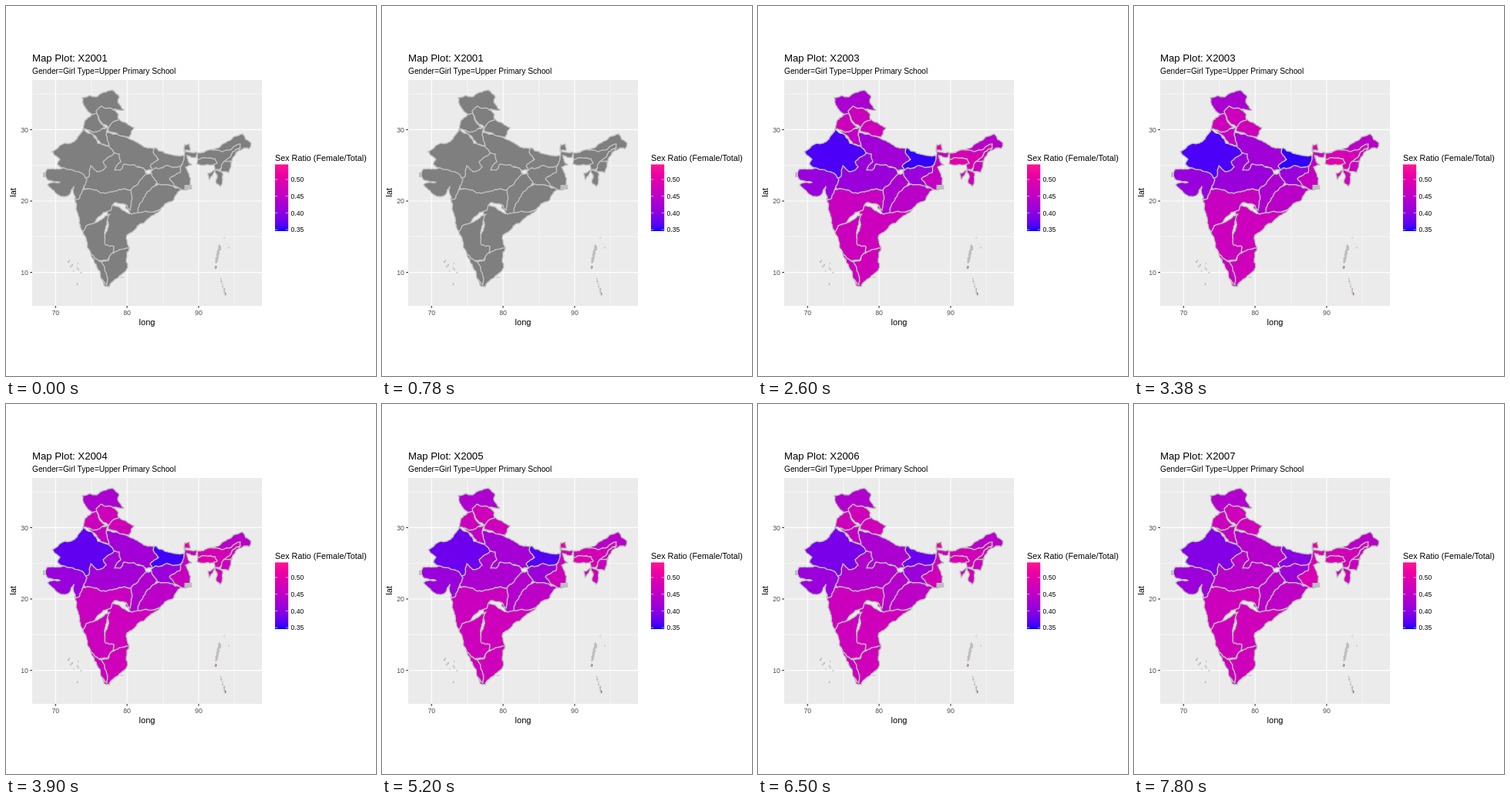
Animation, 480 px wide and 480 px high, one loop 8000 ms. Source, as an HTML page with a canvas:

```html
<!DOCTYPE html>
<html>
<head>
<meta charset="utf-8">
<style>
html, body { margin: 0; width: 100%; height: 100%; overflow: hidden; background: #fff; }
canvas { display: block; }
</style>
</head>
<body>
<canvas id="stage" width="480" height="480"></canvas>
<script>
const ctx = document.getElementById('stage').getContext('2d');
const LOOP = 8000, STEP = 1300, FIRST_YEAR = 2001, LAST_STEP = 6;
const BORDER = '#bebebe', MISSING = '#7f7f7f';
const FONT = '"Liberation Sans", Arial, sans-serif';
const lonX = lon => 64.3 + (lon - 70) * 9.28;
const latY = lat => 160.4 + (30 - lat) * 9.26;
const ratioY = ratio => 225 + (0.5 - ratio) * 434;
const mix = (a, b, t) => a + (b - a) * t;
const noise = seed => {
  const n = Math.sin(seed) * 43758.5453;
  return n - Math.floor(n);
};
const regions = [];

// Blue to deep pink, blended in Lab space; t runs from 0 to 1.
function scaleColor(t) {
  const fy = (mix(32.3, 55.96, t) + 16) / 116;
  const x = 0.9505 * (fy + mix(79.2, 84.5, t) / 500) ** 3;
  const y = fy ** 3;
  const z = 1.089 * (fy - mix(-107.9, -5.7, t) / 200) ** 3;
  const channel = v => {
    v = Math.min(1, Math.max(0, v));
    return Math.round(255 * (v < 0.0031 ? 12.92 * v : 1.055 * v ** (1 / 2.4) - 0.055));
  };
  return `rgb(${channel(3.2406 * x - 1.5372 * y - 0.4986 * z)},${
    channel(-0.9689 * x + 1.8758 * y + 0.0415 * z)},${
    channel(0.0557 * x - 0.204 * y + 1.057 * z)})`;
}

// Midpoint displacement: splits a border until its pieces are short.
function roughLine(path, x1, y1, x2, y2) {
  const dx = x2 - x1, dy = y2 - y1;
  if (Math.hypot(dx, dy) < 3) {
    path.lineTo(x2, y2);
    return;
  }
  const shift = (noise(x1 * 12.9 + y1 * 78.2 + x2 * 3.7 + y2) - 0.5) * 0.26;
  const mx = (x1 + x2) / 2 - dy * shift, my = (y1 + y2) / 2 + dx * shift;
  roughLine(path, x1, y1, mx, my);
  roughLine(path, mx, my, x2, y2);
}

function outline(corners) {
  const points = corners.split(' ').map(p => p.split(',').map(Number));
  const path = new Path2D();
  path.moveTo(...points[0]);
  points.forEach((p, i) => roughLine(path, ...p, ...points[(i + 1) % points.length]));
  path.closePath();
  return path;
}

// The level moves between two scale positions; bend shapes the pace.
// Later regions cover earlier ones and own the shared border.
function region(from, to, bend, corners) {
  const level = step => mix(from, to, ((step - 1) / (LAST_STEP - 1)) ** bend);
  regions.push({ level, path: outline(corners) });
}

// Centre and east
region(0.37, 0.48, 3, '131,164 158,171 175,180 193,185 199,192 197,212 140,217 133,190');
region(0.27, 0.5, 0.75, '134,191 147,192 149,202 141,213 148,213 153,205 178,210 182,218 165,242 105,242 98,232 106,203');
region(0.42, 0.5, 1, '182,218 194,218 198,226 188,240 180,266 168,276 155,262 161,240 174,226');
region(0.03, 0.27, 2.5, '193,184 204,189 231,194 232,199 224,212 190,213 187,208 198,199 191,189');
region(0.33, 0.36, 1, '188,215 195,210 222,209 230,206 226,216 218,235 198,232');
region(0.5, 0.53, 1, '199,231 211,232 228,238 222,243 218,251 204,260 200,264 168,275 175,255 181,244 190,235');
region(0.56, 0.7, 2, '232,192 231,187 248,190 247,196 234,194 241,206 233,209 239,229 241,237 227,238 212,224 226,216 229,205');

// South
region(0.62, 0.64, 1, '200,264 178,282 165,292 157,297 157,306 160,314 143,322 126,310 134,257 163,270 184,267');
region(0.58, 0.62, 1, '89,250 91,264 95,281 100,294 106,291 136,265 141,255 157,259 161,265 163,252 162,239 130,243 105,237 96,239');
region(0.6, 0.63, 1, '100,294 104,285 124,277 135,270 128,297 129,310 140,312 138,321 132,330 119,331 110,321 104,302');
region(0.64, 0.64, 1, '160,314 156,328 156,343 147,350 140,356 134,364 127,362 127,338 120,333 133,330 137,321 145,318');
region(0.6, 0.61, 1, '110,321 124,332 128,343 131,350 131,362 124,354 117,335');

// West and north
region(0, 0.24, 0.7, '100,160 113,167 119,178 133,182 140,191 126,202 130,209 118,215 110,207 107,222 100,226 73,210 67,206 70,199 60,189 69,182 84,178');
region(0.32, 0.35, 1, '50,217 53,212 74,210 94,215 105,225 98,243 95,250 90,252 88,234 83,244 71,247 54,232 70,229 55,226');
region(0.54, 0.56, 1, '107,162 124,159 133,157 130,168 134,181 123,179 113,167');
region(0.62, 0.62, 1, '117,137 106,145 100,160 113,164 129,157 120,147');
region(0.63, 0.64, 1, '135,152 147,147 166,158 160,170 147,168 133,163');
region(0.41, 0.46, 1, '99,119 117,118 138,109 147,118 145,124 153,135 131,138 112,141 101,129');
region(0.62, 0.64, 1, '117,136 123,130 146,141 146,148 133,157 121,147');

// North-east
region(0.78, 0.82, 1, '232,180 238,179 239,187 231,187');
region(0.49, 0.51, 1, '264,190 279,181 295,170 307,166 318,178 316,185 309,184 282,192');
region(0.7, 0.65, 1, '248,191 280,189 304,179 304,184 288,198 280,208 277,212 271,212 270,206 249,200');
region(0.78, 0.7, 1, '249,199 271,198 274,204 248,205');
region(0.62, 0.62, 1, '304,184 288,198 283,202 293,201 298,191');
region(0.6, 0.6, 1, '282,202 293,201 289,216 279,215');
region(0.64, 0.64, 1, '271,212 281,217 278,234 273,230');
region(0.64, 0.64, 1, '271,213 262,217 264,225');

function text(str, x, y, size, color = '#000', align = 'left') {
  ctx.font = `${size}px ${FONT}`;
  ctx.fillStyle = color;
  ctx.textAlign = align;
  ctx.fillText(str, x, y);
}

function line(x1, y1, x2, y2, color, width) {
  ctx.strokeStyle = color;
  ctx.lineWidth = width;
  ctx.beginPath();
  ctx.moveTo(x1, y1);
  ctx.lineTo(x2, y2);
  ctx.stroke();
}

function drawPanel() {
  ctx.fillStyle = '#ebebeb';
  ctx.fillRect(34, 96, 298, 293);
  const vertical = (lon, w) => line(lonX(lon), 96, lonX(lon), 389, '#fff', w);
  const horizontal = (lat, w) => line(34, latY(lat), 332, latY(lat), '#fff', w);
  for (let i = 0; i < 3; i++) {
    vertical(75 + i * 10, 0.55);
    horizontal(15 + i * 10, 0.55);
  }
  for (let i = 0; i < 3; i++) {
    const lon = 70 + i * 10, lat = 10 + i * 10;
    vertical(lon, 1.1);
    horizontal(lat, 1.1);
    line(lonX(lon), 389, lonX(lon), 391.8, '#333', 1.1);
    line(31.2, latY(lat), 34, latY(lat), '#333', 1.1);
    text(lon, lonX(lon), 401, 8.8, '#4d4d4d', 'center');
    text(lat, 29, latY(lat) + 3.3, 8.8, '#4d4d4d', 'right');
  }
}

// A chain of islets between two points, tapering to the given end size.
function islands(count, x1, y1, x2, y2, startSize, endSize, spread) {
  for (let i = 0; i < count; i++) {
    const t = i / (count - 1);
    const size = mix(startSize, endSize, t) * (0.7 + 0.6 * noise(i + x1));
    ctx.beginPath();
    ctx.ellipse(mix(x1, x2, t) + (noise(i * 7 + y1) - 0.5) * spread, mix(y1, y2, t),
      size, size * 1.5, 0.2, 0, 7);
    ctx.fill();
  }
}

function drawMap(step) {
  ctx.lineJoin = 'round';
  ctx.strokeStyle = BORDER;
  ctx.lineWidth = 1.45;
  for (const { level, path } of regions) {
    ctx.fillStyle = step ? scaleColor(level(step)) : MISSING;
    ctx.fill(path);
    ctx.stroke(path);
  }
  ctx.fillStyle = BORDER;
  ctx.fillRect(231.5, 232, 9.5, 6);
  ctx.fillRect(48, 216, 4, 6);
  ctx.fillRect(148, 351.5, 5, 1);
  islands(12, 277, 311, 273, 332, 1.6, 1.5, 2);
  islands(2, 272, 339, 283, 300.5, 1.4, 0.9, 0);
  islands(7, 278, 354, 285, 374, 0.8, 1.6, 2);
  islands(9, 87, 330, 92, 346, 0.8, 0.8, 14);
  islands(2, 92.5, 361, 289, 313.5, 0.8, 0.7, 0);
  ctx.fillStyle = step ? scaleColor(0.6) : MISSING;
  islands(2, 272.5, 339, 284.5, 373, 0.5, 0.5, 0);
}

function drawLegend() {
  text('Sex Ratio (Female/Total)', 349, 201, 10.8);
  const bar = ctx.createLinearGradient(0, 292, 0, 205.5);
  for (let i = 0; i <= 20; i++) bar.addColorStop(i / 20, scaleColor(i / 20));
  ctx.fillStyle = bar;
  ctx.fillRect(349, 205.5, 17.2, 86.5);
  for (let i = 0; i < 4; i++) {
    const ratio = 0.35 + i * 0.05, y = ratioY(ratio);
    line(349, y, 352.4, y, '#fff', 0.6);
    line(362.8, y, 366.2, y, '#fff', 0.6);
    text(ratio.toFixed(2), 369.5, y + 3.2, 8.7);
  }
}

function draw(time) {
  const step = Math.floor((time % LOOP) / STEP);
  ctx.fillStyle = '#fff';
  ctx.fillRect(0, 0, 480, 480);
  text('Map Plot: X' + (FIRST_YEAR + step), 34, 72, 13.2);
  text('Gender=Girl Type=Upper Primary School', 34, 88, 10.2);
  drawPanel();
  drawMap(step);
  drawLegend();
  text('long', 183, 414, 11, '#000', 'center');
  ctx.save();
  ctx.translate(13, 242);
  ctx.rotate(-Math.PI / 2);
  text('lat', 0, 0, 11, '#000', 'center');
  ctx.restore();
}

const start = performance.now();
function tick() {
  draw(performance.now() - start);
  requestAnimationFrame(tick);
}
tick();
</script>
</body>
</html>
```
